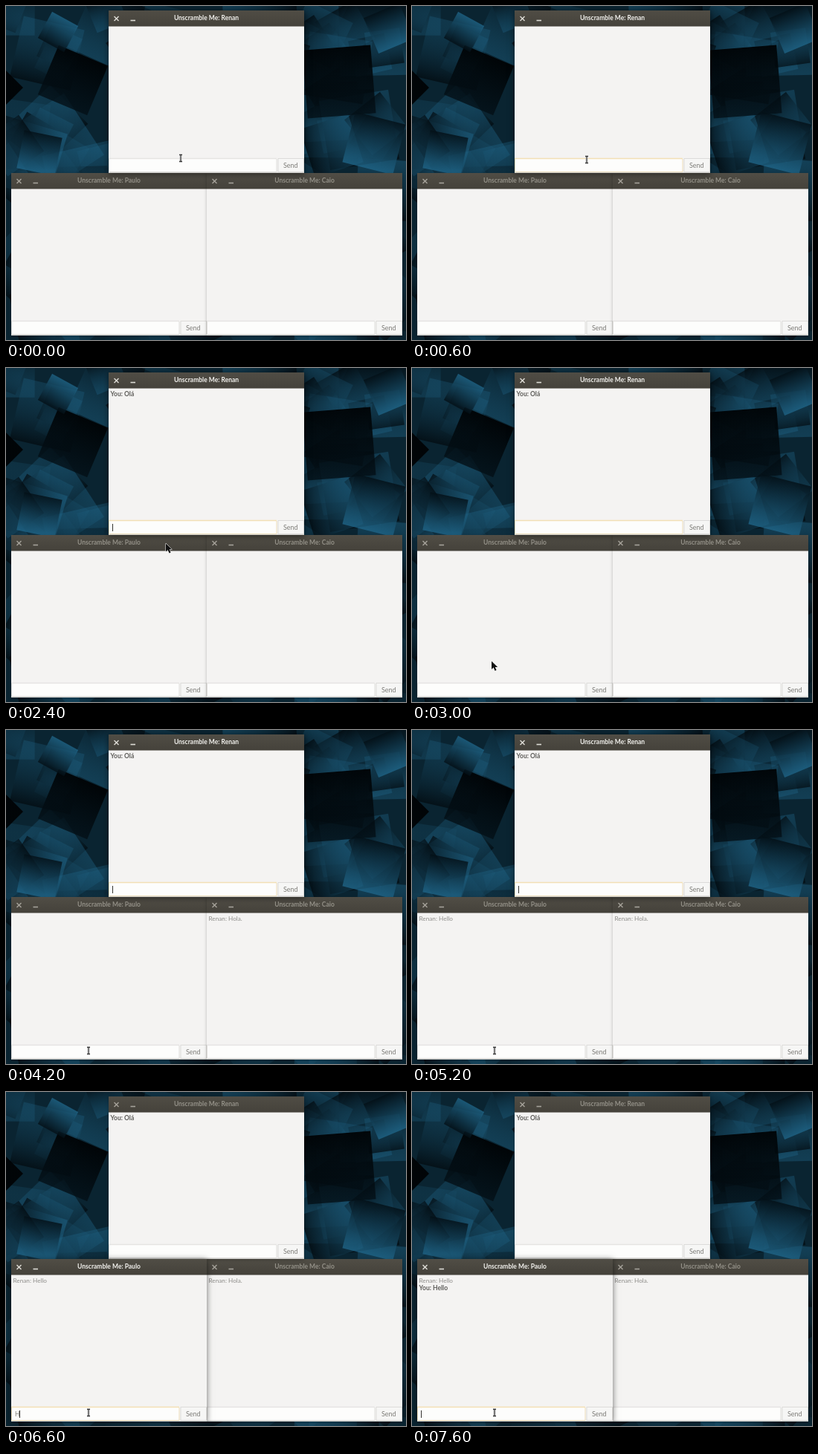
Animation of 538 by 450 pixels, one loop 8 s. Source, as an HTML page with a canvas:

```html
<!DOCTYPE html>
<html lang="en">
<head>
<meta charset="utf-8">
<title>Chat windows</title>
<style>
html, body { margin: 0; width: 100%; height: 100%; overflow: hidden; background: #03090d; }
canvas { display: block; }
</style>
</head>
<body>
<canvas id="stage" width="538" height="450"></canvas>
<script>
const stage = document.getElementById('stage');
const ctx = stage.getContext('2d');
const LOOP = 8000, STEP = 200;
const W = 263, H = 219;

const clamp = v => Math.min(1, Math.max(0, v));
const ramp = (t, from, to) => clamp((t - from) / (to - from));
const smooth = p => p * p * (3 - 2 * p);

function line(color, width, ...points) {
  ctx.beginPath();
  points.forEach(([x, y]) => ctx.lineTo(x, y));
  ctx.strokeStyle = color;
  ctx.lineWidth = width;
  ctx.stroke();
}

function rect(color, x, y, w, h) {
  ctx.fillStyle = color;
  ctx.fillRect(x, y, w, h);
}

function label(text, x, y, color, { bold = false, align = 'left', size = 8.5 } = {}) {
  ctx.font = `${bold ? 'bold ' : ''}${size}px Lato, sans-serif`;
  ctx.textAlign = align;
  ctx.fillStyle = color;
  ctx.fillText(text, x, y);
  return ctx.measureText(text).width;
}

// Wallpaper: translucent tilted squares, painted once
function makeWallpaper() {
  const canvas = document.createElement('canvas');
  canvas.width = stage.width;
  canvas.height = stage.height;
  const g = canvas.getContext('2d');
  let seed = 11;
  const random = () => (seed = seed * 16807 % 2147483647) / 2147483647;

  function tile(x, y, size, angle, from, to) {
    g.save();
    g.translate(x, y);
    g.rotate(angle);
    const shade = g.createLinearGradient(0, -size / 2, 0, size / 2);
    shade.addColorStop(0, from);
    shade.addColorStop(1, to);
    g.fillStyle = shade;
    g.fillRect(-size / 2, -size / 2, size, size);
    g.restore();
  }

  g.fillStyle = '#0a2431';
  g.fillRect(0, 0, canvas.width, canvas.height);
  for (let i = 0; i < 110; i++) {
    tile(random() * 538, random() * 450, 40 + random() * 60, random() * 6.3,
      'rgba(1,7,11,.65)', `rgba(32,104,140,${0.15 + random() * 0.3})`);
  }
  const black = 'rgba(0,3,5,.95)', deep = 'rgba(3,15,22,.8)', blue = 'rgba(32,104,140,.75)';
  tile(90, 100, 72, 0.4, black, deep);
  tile(70, 35, 40, 0.5, blue, deep);
  tile(45, 198, 52, 0.2, deep, blue);
  tile(-35, 110, 82, Math.PI / 4, black, black);
  tile(515, 30, 52, -0.4, deep, blue);
  tile(448, 102, 92, -0.08, black, deep);
  tile(495, 185, 70, 0.25, deep, blue);
  return canvas;
}
const wallpaper = makeWallpaper();

function drawWindow({ x, y, name, active, messages, focus, input = '', caret }) {
  ctx.save();
  ctx.translate(x, y);

  ctx.save();
  ctx.shadowColor = active ? 'rgba(0,0,0,.55)' : 'rgba(0,0,0,.25)';
  ctx.shadowBlur = active ? 8 : 4;
  ctx.shadowOffsetY = 1;
  rect('#f4f3f2', 0, 0, W, H);
  ctx.restore();

  const bar = ctx.createLinearGradient(0, 0, 0, 21);
  bar.addColorStop(0, '#504d45');
  bar.addColorStop(1, '#45423b');
  rect(bar, 0, 0, W, 21.5);
  const icon = active ? '#dedcd6' : '#a5a29a';
  line(icon, 1.4, [7.5, 8], [13.5, 14]);
  line(icon, 1.4, [13.5, 8], [7.5, 14]);
  line(icon, 1.6, [29.5, 13.5], [36, 13.5]);
  label('Unscramble Me: ' + name, W / 2, 13.3, active ? '#f3f2ee' : '#949188',
    { bold: true, align: 'center' });

  messages.forEach((text, i) => {
    const bold = text.startsWith('You');
    label(text, 2.5, 32 + i * 9.7, bold ? '#5c5b58' : '#8c8b88', { bold, size: bold ? 8.5 : 8.2 });
  });

  rect('#fdfdfc', 0, 199, 226.5, 19);
  line(focus ? '#f2dfb5' : '#e5e4e2', 1.5, [0, 199.5], [226, 199.5]);
  line(focus ? '#ecdcb9' : '#dddcda', 1, [0.5, 200], [0.5, 217.5], [226, 217.5], [226, 200]);
  rect('#f6f6f5', 228, 199, 34, 19);
  ctx.strokeStyle = '#dcdbd9';
  ctx.lineWidth = 1;
  ctx.strokeRect(228, 199.5, 34.5, 18);
  line('#d3d2cf', 1, [0, H - 0.5], [W, H - 0.5]);
  label('Send', 244.8, 212, '#7d7c78', { align: 'center', size: 9 });

  const width = label(input, 5, 212, '#82817d');
  if (caret) rect('#33322f', Math.round(5 + width), 204, 1, 10);
  ctx.restore();
}

function drawPointer(t) {
  const glide = smooth(ramp(t, 2200, 3000));
  const drop = ramp(t, 3000, 3400);
  ctx.save();
  ctx.translate(235 - 128 * glide + 4 * drop,
    205 + 2 * ramp(t, 0, 600) + 188 * glide + 37 * drop);
  if (t >= 2400 && t < 3400) {
    const arrow = new Path2D('M0 0V11L2.6 8.6L4.6 13L6.6 12L4.7 7.9H8.2Z');
    ctx.lineWidth = 1;
    ctx.strokeStyle = '#fff';
    ctx.stroke(arrow);
    ctx.fillStyle = '#111';
    ctx.fill(arrow);
  } else {
    for (const [color, width] of [['#ccc', 3], ['#333', 1.1]]) {
      line(color, width, [0, -4.5], [0, 4.5]);
      line(color, width, [-2, -4.5], [2, -4.5]);
      line(color, width, [-2, 4.5], [2, 4.5]);
    }
  }
  ctx.restore();
}

// Text typed so far: `rate` more letters after every `pause`
const typed = (word, elapsed, pause, rate) =>
  elapsed < 0 ? '' : word.slice(0, Math.round(1 + rate * Math.floor(elapsed / pause)));

function draw(now) {
  const t = Math.floor(now % LOOP / STEP) * STEP;
  const sent = t >= 2200, switched = t >= 5600, replied = t >= 7600;
  const blink = !sent || (t - 2000) % 1400 < 1000;

  ctx.drawImage(wallpaper, 0, 0);
  const windows = [
    {
      x: 7, y: 225, name: 'Paulo', active: switched, focus: switched,
      messages: [t >= 4800 && 'Renan: Hello', replied && 'You: Hello'].filter(Boolean),
      input: replied ? '' : typed('Hello', t - 6600, 200, 1.4),
      caret: t >= 6000,
    },
    { x: 270, y: 225, name: 'Caio', active: false, messages: t >= 4200 ? ['Renan: Hola.'] : [] },
    {
      x: 138, y: 6, name: 'Renan', active: !switched, focus: t >= 600 && !switched,
      messages: sent ? ['You: Olá'] : [],
      input: sent ? '' : typed('Olá', t - 1400, 400, 2),
      caret: t >= 1000 && !switched && blink,
    },
  ];
  // The active window lies on top
  windows.sort((a, b) => a.active - b.active).forEach(drawWindow);
  drawPointer(t);
}

const start = performance.now();
function tick() {
  draw(performance.now() - start);
  requestAnimationFrame(tick);
}
tick();
</script>
</body>
</html>
```
